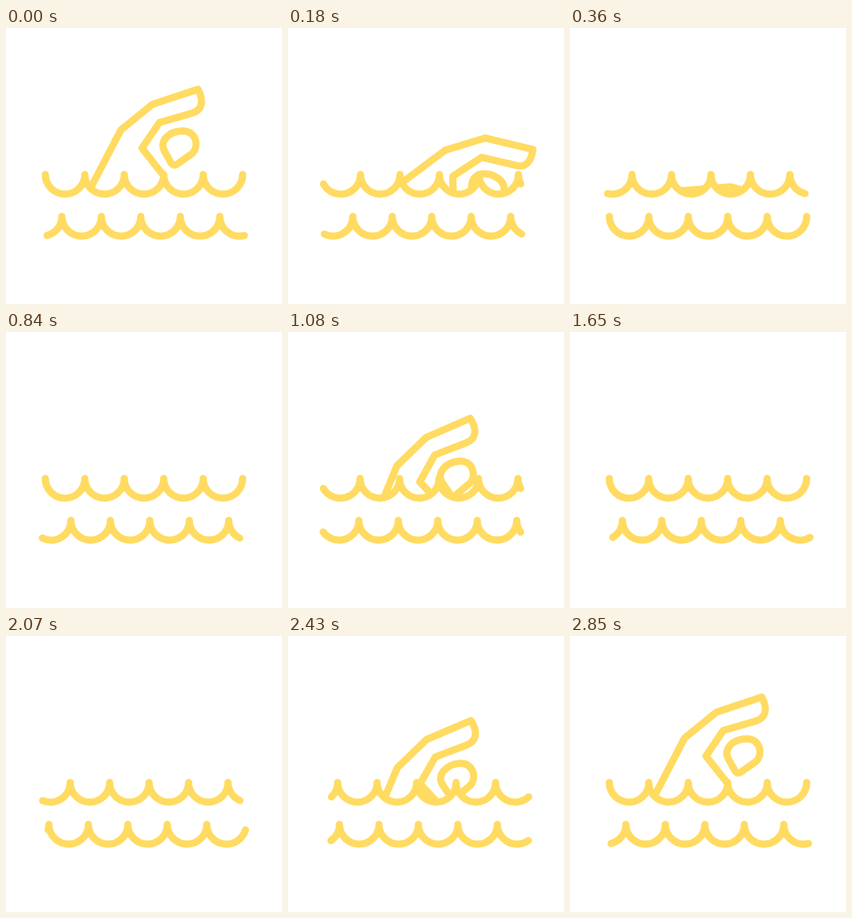
Animation, 400 px wide and 400 px high, one loop 5130 ms. Source, as an HTML page:

```html
<!DOCTYPE html>
<html lang="en">
<head>
<meta charset="utf-8">
<title>Swimmer</title>
<style>
  html, body { margin: 0; width: 100%; height: 100%; overflow: hidden; background: #fff; }
  svg { display: block; width: 100vw; height: 100vh; }
</style>
</head>
<body>
<svg viewBox="0 0 400 400" fill="none" stroke="#ffdb62" stroke-width="10.4" stroke-linecap="round" stroke-linejoin="round">
  <clipPath id="air"><path id="surface"/></clipPath>
  <g clip-path="url(#air)">
    <g id="swimmer">
      <path id="arm"/>
      <path id="head" d="M239.500 196Q243 200.500 248 197L270 181.500C280 171 276 149 256 149C236 149 221.500 164 229.500 178Z"/>
    </g>
  </g>
  <path id="near"/>
  <path id="far"/>
</svg>
<script>
const LOOP = 5130, REST = 2850, STROKE = 1220;
const LEFT = 57, SPAN = 57.2, R = SPAN / 2, ARCS = 5;
const NEAR_Y = 212.2, FAR_Y = 273;

// Wave travel, counted in arcs.
const TIMES = [0, 360, 840, 1290, 1650, 2070, REST];
const NEAR = [0, 0.423, 1, 1.336, 2, 2.37, 3];
const FAR = [0.58, 0, -0.647, -0.927, -1.33, -2.09, -2.42];

// Arm outline with the hand raised, and slightly later in the stroke.
const RAISED = [[124, 229], [166, 148], [212, 110.500], [278, 88.500], [288, 108],
  [282, 119], [270, 123], [222, 137], [197, 174], [228, 213]];
const REACHED = [[130, 237], [185, 153], [233, 117], [304, 109], [308, 128],
  [302, 138], [289, 139], [238, 145], [208, 185], [229, 239]];
const PIVOT = "130 240";

const el = id => document.getElementById(id);
const set = (id, name, value) => el(id).setAttribute(name, value);
const clamp = x => Math.max(0, Math.min(1, x));
const mix = (a, b, k) => a + (b - a) * k;
const point = p => p.map(v => v.toFixed(2)).join(" ");

// Smooth monotone curve through the values.
function follow(values, t) {
  const last = TIMES.length - 1;
  let i = 0;
  while (i < last - 1 && t > TIMES[i + 1]) i++;
  const rate = j => (values[j + 1] - values[j]) / (TIMES[j + 1] - TIMES[j]);
  const slope = j => {
    if (j === 0 || j === last) return 0;
    const a = rate(j - 1), b = rate(j);
    return 2 * a * b / (a + b);
  };
  const h = TIMES[i + 1] - TIMES[i], x = clamp((t - TIMES[i]) / h), y = 1 - x;
  return values[i] * (1 + 2 * x) * y * y + slope(i) * h * x * y * y
    + values[i + 1] * x * x * (3 - 2 * x) - slope(i + 1) * h * x * x * y;
}

// A strip of constant length slides along the arcs while they drift under it.
function wave(travel, y) {
  const u = travel - Math.floor(travel), x0 = LEFT - SPAN * u;
  const end = n => point([x0 + n * SPAN + R * (1 - Math.cos(Math.PI * u)), y + R * Math.sin(Math.PI * u)]);
  const arc = p => `A${R} ${R} 0 0 0 ${p}`;
  let d = "M" + end(0);
  for (let n = 1; n <= ARCS; n++) d += arc(point([x0 + n * SPAN, y]));
  return d + arc(end(ARCS));
}

function airAbove(travel, y) {
  const u = travel - Math.floor(travel), x0 = LEFT - SPAN * (u + 1);
  let d = `M${x0} 0V${y}`;
  for (let n = 1; n <= 8; n++) d += `A${R} ${R} 0 0 0 ${x0 + n * SPAN} ${y}`;
  return d + "V0Z";
}

// bend: raised to reached; fall: turning into the water; sink: depth before rising.
function pose(t) {
  const rise = t < STROKE
    ? { start: 890, end: STROKE, power: 1.6 }
    : { start: 2170, end: REST, power: 3 };
  if (t >= rise.start) {
    const x = clamp((t - rise.start) / (rise.end - rise.start));
    return { bend: 0, fall: 0, sink: Math.pow(1 - x, rise.power), shown: x > 0 };
  }
  const s = t < STROKE ? t : t - STROKE;
  return { bend: clamp(s / 70), fall: Math.max(0, (s - 70) / 290), sink: 0, shown: s < 420 };
}

function drawSwimmer(t) {
  const { bend, fall, sink, shown } = pose(t);
  set("swimmer", "display", shown ? "inline" : "none");
  if (!shown) return;
  const p = RAISED.map((a, i) => point([mix(a[0], REACHED[i][0], bend), mix(a[1], REACHED[i][1], bend)]));
  set("arm", "d", `M${p[0]}L${p[1]}L${p[2]}L${p[3]}C${p[4]} ${p[5]} ${p[6]}L${p[7]}L${p[8]}L${p[9]}`);
  set("head", "transform", `translate(${9 * bend} ${15 * bend}) rotate(${17 * bend} 253 172)`);
  const dx = 18 * Math.sin(Math.PI * Math.min(1, fall));
  set("swimmer", "transform", `translate(${dx} ${195 * sink}) rotate(${52 * fall - 20 * sink} ${PIVOT})`);
}

function draw(now) {
  const t = Math.min(now % LOOP, REST);
  const near = follow(NEAR, t);
  set("near", "d", wave(near, NEAR_Y));
  set("far", "d", wave(follow(FAR, t), FAR_Y));
  set("surface", "d", airAbove(near, NEAR_Y));
  drawSwimmer(t);
}

const start = performance.now();
function tick() {
  draw(performance.now() - start);
  requestAnimationFrame(tick);
}
tick();
</script>
</body>
</html>
```
